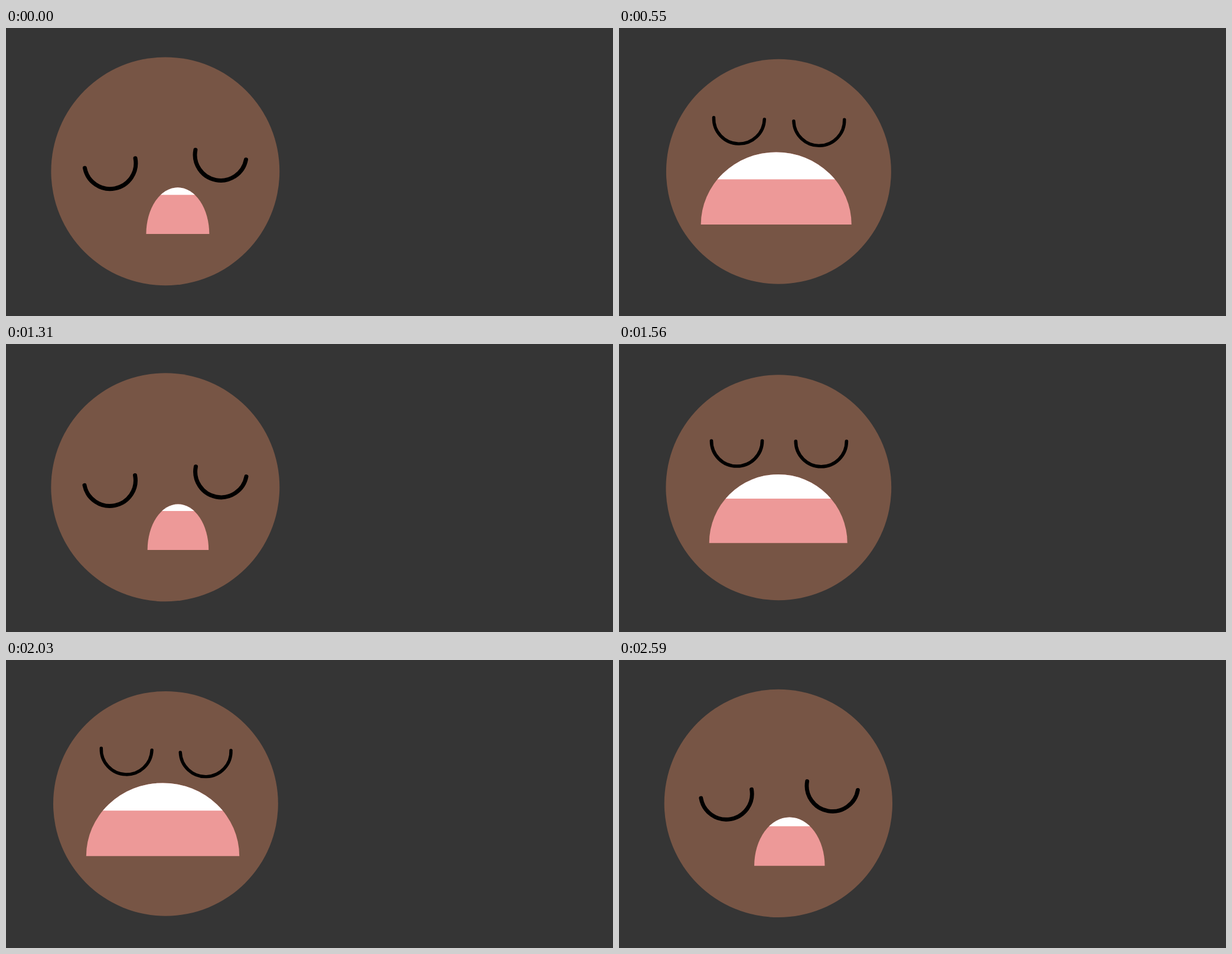
An HTML page for the animation above (2.69 s loop, 1028x488 px).

```html
<!DOCTYPE html>
<html lang="en">
<head>
<meta charset="utf-8">
<title>Yawning face</title>
<style>
  html, body { margin: 0; width: 100%; height: 100%; overflow: hidden; background: #353535; }
  svg { display: block; width: 100%; height: 100%; }
  .eye { fill: none; stroke: #000; stroke-linecap: round; }
</style>
</head>
<body>
<svg viewBox="0 0 1028 488">
  <defs>
    <clipPath id="lips"><path id="lipShape"/></clipPath>
  </defs>
  <circle id="face" fill="#775545"/>
  <path id="left" class="eye"/>
  <path id="right" class="eye"/>
  <path id="mouth" fill="#ed9998"/>
  <rect id="teeth" fill="#fff" clip-path="url(#lips)"/>
</svg>
<script>
const LOOP = 2690;
const $ = id => document.getElementById(id);
const mix = (a, b, p) => a + (b - a) * p;
const decay = (t, tau) => Math.exp(-t / tau);

function set(id, attrs) {
  for (const key in attrs) $(id).setAttribute(key, attrs[key]);
}

// How far the mouth is open (0..1), and whether it is closing.
function poseAt(t) {
  if (t < 890) return { p: 1 - 0.975 * decay(t, 160), closing: false };
  if (t < 990) return { p: 1, closing: false };
  if (t < 1330) return { p: decay(t - 890, 75), closing: true };
  if (t < 2240) return { p: 1 - decay(t - 1330, 128), closing: false };
  return { p: decay(Math.min(t, 2590) - 2240, 155), closing: true };
}

function drawEye(id, x, y, degrees, p) {
  const r = mix(43.6, 42.9, p);
  set(id, {
    d: `M${-r} 0A${r} ${r} 0 0 0 ${r} 0`,
    transform: `translate(${x} ${y}) rotate(${degrees})`,
    "stroke-width": mix(7, 5.4, p)
  });
}

function drawMouth(p) {
  const cx = mix(291.5, 265.4, p);
  const rx = mix(51.5, 130, p);
  const ry = mix(77.5, 124, p);
  const bottom = 349 - 17 * p * p;
  const d = `M${cx - rx} ${bottom}A${rx} ${ry} 0 0 1 ${cx + rx} ${bottom}Z`;
  const top = bottom - ry;
  set("mouth", { d });
  set("lipShape", { d });
  set("teeth", {
    x: cx - rx, y: top - 1, width: 2 * rx,
    height: bottom - mix(66, 77, p) - top + 1
  });
}

function draw(t) {
  const { p, closing } = poseAt(t);
  // The eyes swing along a slight arc on the way down.
  const arc = closing ? p * (1 - p) ** 2 : 0;
  const drop = p - 0.6 * arc;
  set("face", { cx: mix(269.8, 270.4, p), cy: mix(242.8, 243.3, p), r: mix(193.5, 190.4, p) });
  drawEye("left", mix(175.5, 204.3, p) + 38 * arc, mix(231, 150.7, drop), mix(-11.2, 2.3, p), p);
  drawEye("right", mix(364.3, 338, p), mix(216.3, 154.5, drop), mix(11.2, -2.2, p), p);
  drawMouth(p);
}

let start;
function tick(now) {
  start ??= now;
  draw((now - start) % LOOP);
  requestAnimationFrame(tick);
}
draw(0);
requestAnimationFrame(tick);
</script>
</body>
</html>
```
